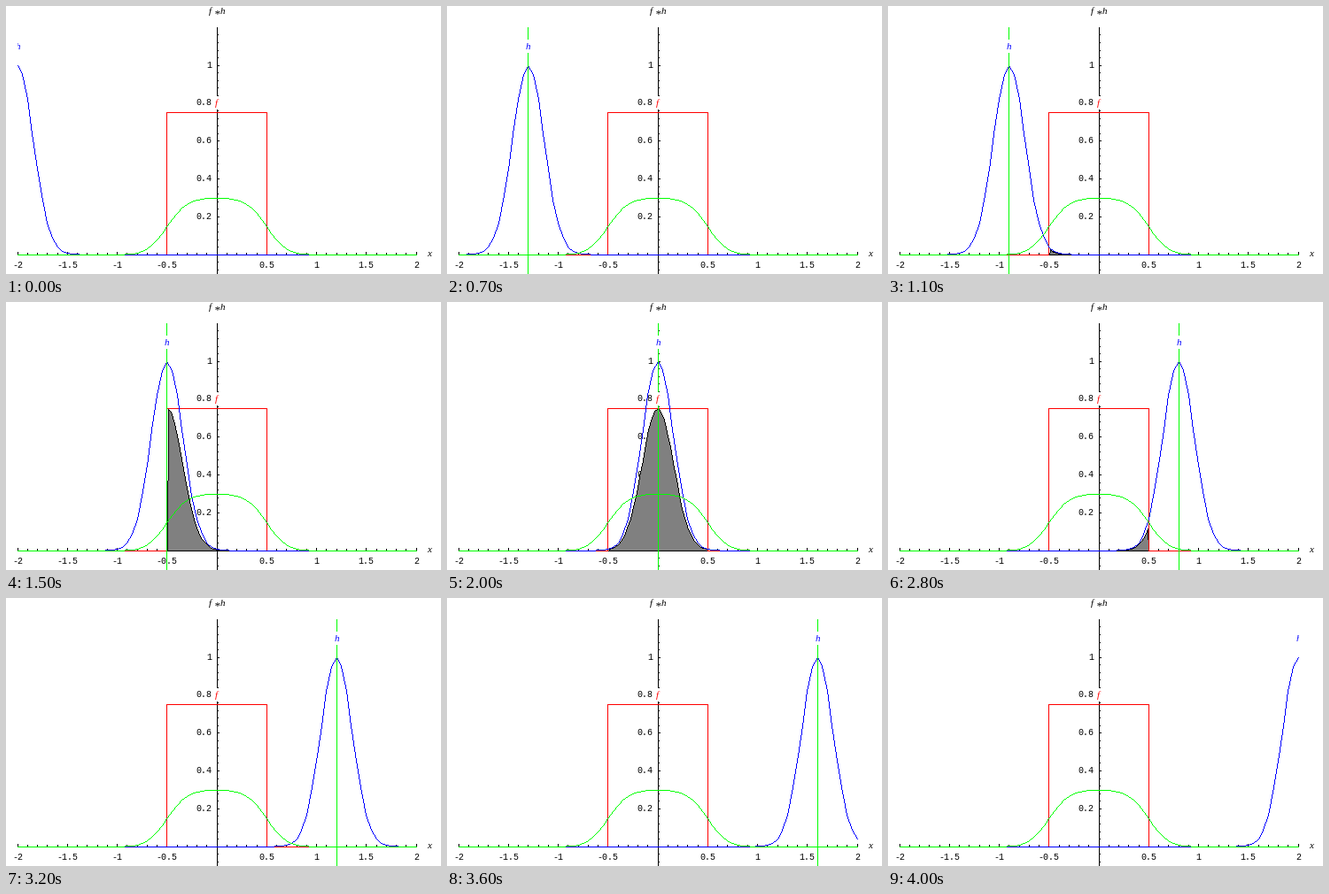
A matplotlib script for the animation above (4100 ms loop, 491 by 303 pixels).

```python
import math

import matplotlib.pyplot as plt
import numpy as np
from matplotlib.animation import FuncAnimation
from matplotlib.collections import PolyCollection
from matplotlib.patches import Polygon, Rectangle

W, H, DPI = 491, 303, 100
PX = 72 / DPI
LEFT, RIGHT, TOP, BOTTOM = 13, 464, 24, 303
STEPS, STEP_MS = 41, 100
SHARP, BOX_H, REACH = 20, 0.75, 0.6
SQUARE = np.array([[0, 0], [1, 0], [1, 1], [0, 1]])
GRID = np.linspace(-2, 2, 81)

fig = plt.figure(figsize=(W / DPI, H / DPI), dpi=DPI, facecolor="white")
ax = fig.add_axes([0, 0, 1, 1])
ax.set_xlim(0, W)
ax.set_ylim(H, 0)
ax.axis("off")


def col(x):
    return np.floor(238 + 112.5 * np.asarray(x) + 1e-6)


def row(y):
    return np.floor(281.15 - 214 * np.asarray(y) + 1e-6)


def trace(cols, rows):
    """Unit squares of a hard-edged line, one pixel wide, through the points."""
    steps = np.maximum(np.abs(np.diff(cols)), np.abs(np.diff(rows)))
    along = np.r_[0, np.cumsum(steps)]
    at = np.arange(along[-1] + 1)
    pts = np.column_stack([np.interp(at, along, cols),
                           np.interp(at, along, rows)])
    return np.floor(pts + 0.5)[:, None] + SQUARE


def ink(squares, color, z):
    return ax.add_collection(PolyCollection(
        squares, facecolors=color, edgecolors="none", linewidths=0,
        snap=False, zorder=z))


def number(x, y, s, ha):
    ax.text(x, y, s, family="Liberation Mono", size=10 * PX, ha=ha,
            va="baseline", zorder=1)


def symbol(x, y, s, color="black", size=11):
    return ax.text(x, y, s, family="Liberation Serif", style="italic",
                   size=size * PX, color=color, ha="center", va="baseline",
                   zorder=8)


def backing(x, y):
    return ax.add_patch(Rectangle((x - 3, y - 8), 7, 15, fc="white",
                                  ec="none", snap=False, zorder=7))


def bell(x):
    return np.exp(-SHARP * x ** 2)


def smoothed(x):
    s = math.sqrt(SHARP)
    area = BOX_H * math.sqrt(math.pi / SHARP) / 2
    return area * (math.erf(s * (x + 0.5)) - math.erf(s * (x - 0.5)))


def draw_axes():
    x0, y0 = col(0), row(0)
    parts = [trace([LEFT, RIGHT - 1], [y0, y0]),
             trace([x0, x0], [TOP, BOTTOM - 1])]
    for k in range(-20, 21):
        x, major = col(k / 10), k % 5 == 0
        parts.append(trace([x, x], [y0, y0 - (3 if major else 2)]))
        if major and k:
            number(238 + 11.25 * k, 296, f"{k / 10:g}", "center")
    for k in range(-2, 30):
        y, major = row(k / 25), k % 5 == 0
        parts.append(trace([x0, x0 + (2 if major else 1)], [y, y]))
        if major and k > 0:
            number(232.5, y + 3, f"{k / 25:g}", "right")
    ink(np.concatenate(parts), "black", 1)


def draw_fixed():
    symbol(230.5, 9, "f")
    symbol(238, 12, "*", size=13)
    symbol(244.5, 9, "h")
    symbol(478, 283.3, "x")
    box = trace(col([-2, -0.5, -0.5, 0.5, 0.5, 2]),
                row([0, 0, BOX_H, BOX_H, 0, 0]))
    ink(box, "#ff0000", 3)
    ink(trace(col(GRID), row([smoothed(x) for x in GRID])), "#00ff00", 5)
    backing(238, 110)
    symbol(237.8, 113, "f", "#ff0000")


draw_axes()
draw_fixed()

overlap = ax.add_patch(Polygon([(0, 0), (1, 0), (1, 1)], closed=True,
                               fc="#808080", ec="none", zorder=2))
outline = ink([SQUARE], "black", 2.5)
curve = ink([SQUARE], "#0000ff", 4)
marker = ink([SQUARE], "#00ff00", 6)
h_back = backing(0, 46)
h_text = symbol(0, 49.3, "h", "#0000ff")
plot_area = Rectangle((LEFT, TOP), RIGHT - LEFT, BOTTOM - TOP,
                      transform=ax.transData)
for part in (h_back, h_text):
    part.set_clip_on(True)
    part.set_clip_path(plot_area)


def update(i):
    c = (i - 20) / 10
    x = col(c)
    curve.set_verts(trace(col(GRID), row(bell(GRID - c))))

    lo, hi = max(-0.5, c - REACH), min(0.5, c + REACH)
    shared = hi - lo > 0.02
    overlap.set_visible(shared)
    outline.set_visible(shared)
    if shared:
        xs = np.linspace(lo + 0.012, hi - 0.006, 33)
        ys = BOX_H * bell(xs - c)
        cols = col(np.r_[lo + 0.004, xs, hi, lo + 0.004])
        rows = row(np.r_[0, ys, 0, 0])
        overlap.set_xy(np.column_stack([cols, rows]) + 0.5)
        outline.set_verts(trace(cols, rows))

    marker.set_verts(trace([x, x], [TOP, BOTTOM - 1]))
    marker.set_visible(abs(c) < 2)
    h_back.set_x(x - 3)
    h_text.set_x(x + 0.3)
    return overlap, outline, curve, marker, h_back, h_text


anim = FuncAnimation(fig, update, frames=STEPS, interval=STEP_MS,
                     repeat=True, repeat_delay=0, blit=False)
plt.show()
```
